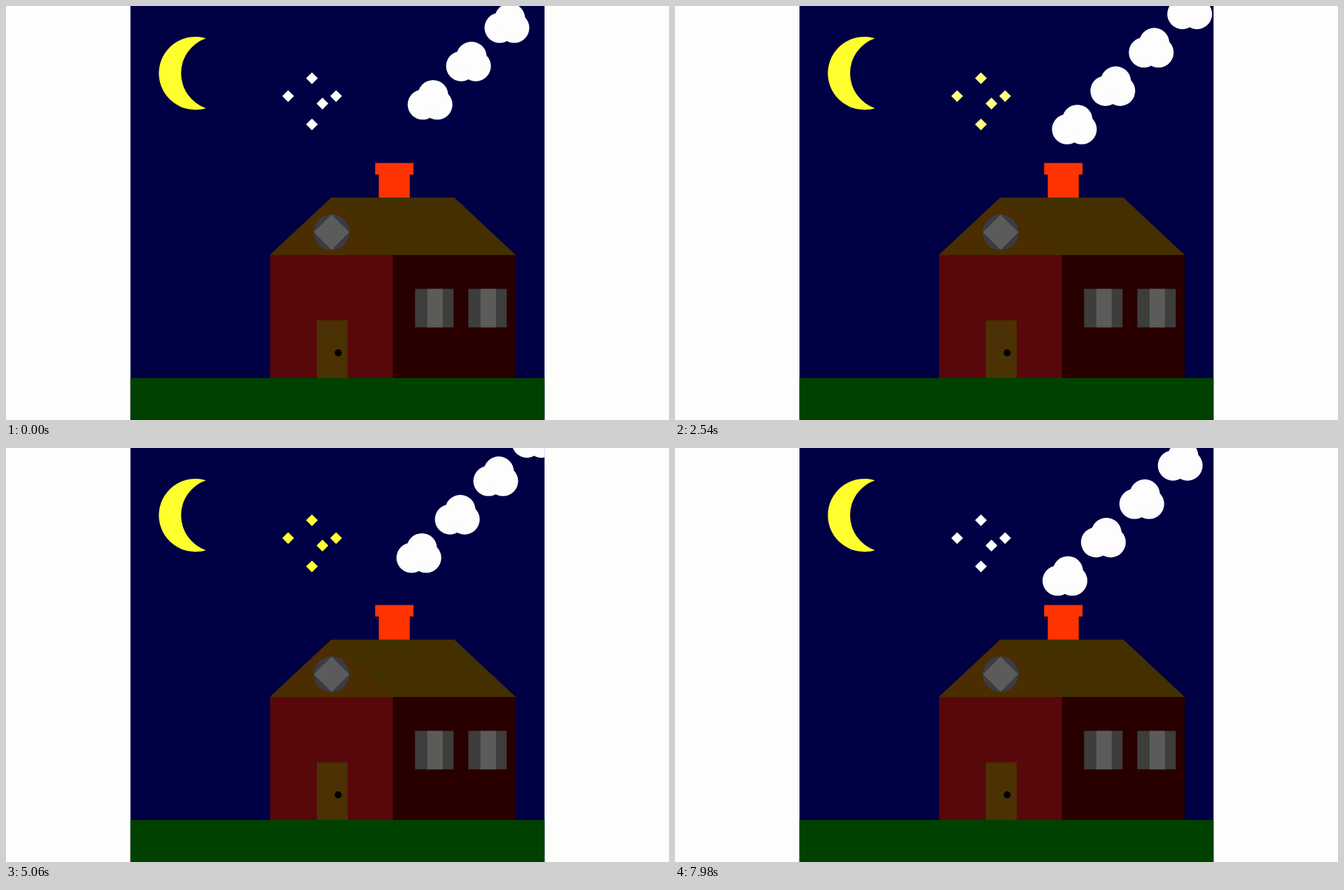
Animation of 947x592 px, one loop 8000 ms. Source, as an HTML page:

```html
<!DOCTYPE html>
<html lang="en">
<head>
<meta charset="utf-8">
<title>House at night</title>
<style>
  html, body { margin: 0; width: 100%; height: 100%; overflow: hidden; background: #fdfdfc; }
  svg { display: block; width: 100%; height: 100%; }
</style>
</head>
<body>
<svg viewBox="0 0 947 592">
  <defs>
    <clipPath id="sky"><rect x="177.5" width="592" height="592"/></clipPath>
    <g id="puff">
      <circle cx="-10.4" cy="7" r="21.6"/>
      <circle cx="10.4" cy="7" r="21.6"/>
      <circle cx="4.3" cy="-6.5" r="21.6"/>
    </g>
    <path id="star" d="M0-8.4 8.4 0 0 8.4-8.4 0Z"/>
    <g id="window">
      <rect width="55" height="55" fill="#3d3d3c"/>
      <rect x="17.5" width="22" height="55" fill="#5b5b59"/>
    </g>
  </defs>
  <rect width="947" height="592" fill="#fdfdfc"/>
  <g clip-path="url(#sky)">
    <rect x="177.5" width="592" height="592" fill="#000045"/>
    <path d="M285.5 46.2A52.2 52.2 0 1 0 285.5 146.2A53 53 0 0 1 285.5 46.2Z" fill="#ffff2e"/>
    <g id="stars">
      <use href="#star" x="437" y="103.3"/>
      <use href="#star" x="403" y="128.8"/>
      <use href="#star" x="471.5" y="128.8"/>
      <use href="#star" x="452" y="139.5"/>
      <use href="#star" x="437" y="169.3"/>
    </g>
    <g id="smoke" fill="#fdfdfd"></g>
    <path d="M527.3 224.6h54.8V241h-5.4v34H532.5v-34h-5.2Z" fill="#ff3300"/>
    <path d="M377 356 464.7 274H640.5L728 356Z" fill="#432f00"/>
    <path d="M377 356 464.7 274 552.7 356Z" fill="#4a2d00"/>
    <circle cx="465" cy="323.5" r="25.5" fill="#3b3b46"/>
    <path d="M465 298.2 490.3 323.5 465 348.8 439.7 323.5Z" fill="#5b5b59"/>
    <rect x="377.3" y="356" width="175.5" height="176" fill="#58080a"/>
    <rect x="552.8" y="356" width="175.2" height="176" fill="#290000"/>
    <rect x="444" y="449.5" width="44" height="82.5" fill="#4b3103"/>
    <circle cx="474.5" cy="496" r="5"/>
    <use href="#window" x="584.3" y="404.5"/>
    <use href="#window" x="660.3" y="404.5"/>
    <rect x="177.5" y="532" width="592" height="60" fill="#004100"/>
  </g>
</svg>
<script>
const LOOP = 8000;
const GAP = 54.9;        // distance between puffs
const DRIFT = 0.357;     // distance per step
const BIRTH = 1.1 - GAP; // where a new puff pops up
const BLINK = 42.86;     // steps per star cycle

const stars = document.getElementById('stars');
const smoke = document.getElementById('smoke');
const puffs = [-2, -1, 0, 1, 2, 3].map(slot => {
  const el = document.createElementNS('http://www.w3.org/2000/svg', 'use');
  el.setAttribute('href', '#puff');
  smoke.append(el);
  return { el, slot };
});

// Playback rhythm: two short steps, then a long one, every 140 ms.
function stepAt(ms) {
  const t = ms + 20;
  return 3 * Math.floor(t / 140) + Math.min(2, Math.floor(t % 140 / 20)) - 1;
}

function draw(ms) {
  const step = stepAt(ms);
  for (const { el, slot } of puffs) {
    const d = step * DRIFT + slot * GAP;
    el.setAttribute('transform', `translate(${605.7 + d} ${134 - d})`);
    el.setAttribute('visibility', d < BIRTH ? 'hidden' : 'visible');
  }
  const glow = 0.5 - 0.5 * Math.cos(2 * Math.PI * step / BLINK);
  stars.setAttribute('fill', `rgb(255,255,${Math.round(253 - 207 * glow)})`);
}

const start = performance.now();
function tick() {
  draw((performance.now() - start) % LOOP);
  requestAnimationFrame(tick);
}
tick();
</script>
</body>
</html>
```
